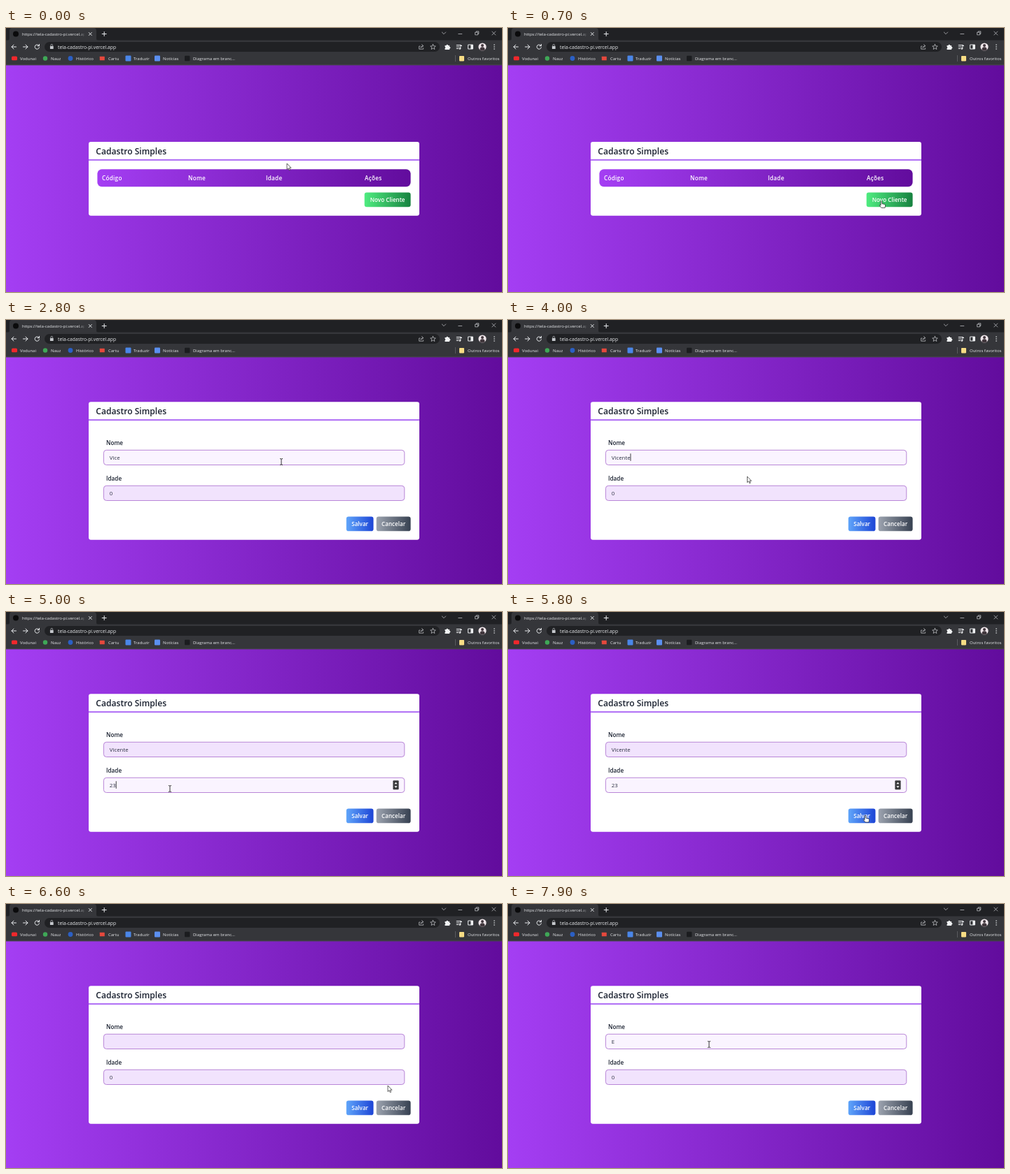
Write an HTML page that moves like this. It is 708 px wide and 378 px high and loops after 8000 ms.

```html
<!DOCTYPE html>
<html lang="pt-BR">
<head>
<meta charset="utf-8">
<title>Cadastro Simples</title>
<style>
html, body { margin: 0; width: 100%; height: 100%; overflow: hidden; background: #35363a; }
svg { display: block; width: 708px; height: 378px; font-family: "Open Sans", "Noto Sans", sans-serif; }
text { white-space: pre; }
.title { font-size: 12.1px; font-weight: 600; fill: #1a2130; }
.label { font-size: 8.2px; font-weight: 600; fill: #1a2130; }
.head { font-size: 8.2px; font-weight: 600; fill: #fff; letter-spacing: .25px; }
.value { font-size: 7.85px; fill: #2b3040; }
.btn { font-size: 8.1px; font-weight: 600; fill: #fff; }
.ui { font-size: 6px; fill: #e8eaed; }
.url { font-size: 6.75px; fill: #e8eaed; }
.line { fill: none; stroke: #e8eaed; stroke-width: 1; stroke-linecap: round; stroke-linejoin: round; }
.thin { stroke: #c3c5c9; stroke-width: .75; }
</style>
</head>
<body>
<svg id="stage" viewBox="0 0 708 378">
  <defs id="defs"></defs>
  <g id="page"></g>
  <g id="empty"></g>
  <g id="filled"></g>
  <g id="form"></g>
  <g id="pointer"></g>
</svg>
<script>
const LOOP = 8000, STEP = 100;
const OPEN = 900, SAVED = 5900, REOPEN = 6600;
const MIDDLE = 215.8;
const $ = id => document.getElementById(id);

const rect = (x, y, w, h, fill, r = 0, more = '') =>
  `<rect x="${x}" y="${y}" width="${w}" height="${h}" rx="${r}" fill="${fill}" ${more}/>`;
const text = (x, y, cls, s, more = '') => `<text x="${x}" y="${y}" class="${cls}" ${more}>${s}</text>`;
const line = (d, cls = '', more = '') => `<path class="line ${cls}" d="${d}" ${more}/>`;
const dot = (x, y, r, fill) => `<circle cx="${x}" cy="${y}" r="${r}" fill="${fill}"/>`;
const grad = (id, a, b) =>
  `<linearGradient id="${id}"><stop stop-color="${a}"/><stop offset="1" stop-color="${b}"/></linearGradient>`;

$('defs').innerHTML =
  grad('purple', '#a43ef3', '#620c9d') +
  grad('green', '#4fec80', '#178240') +
  grad('blue', '#60a5fa', '#1d45d6') +
  grad('gray', '#9ca3af', '#374151') +
  `<linearGradient id="fade"><stop stop-color="#35363a" stop-opacity="0"/><stop offset="1" stop-color="#35363a"/></linearGradient>`;

function browser() {
  const marks = [
    [20, 'Vodunai'], [64, 'Nauz'], [100, 'Histórico'], [146, 'Cartu'],
    [182, 'Traduzir'], [224, 'Notícias'], [267, 'Diagrama em branc...'], [659, 'Outros favoritos']
  ];
  return rect(0, 0, 708, 18, '#202124') +
    `<path d="M2 18q3 0 3-3V4q0-4 4-4H125q4 0 4 4V15q0 3 3 3z" fill="#35363a"/>` +
    rect(0, 17.5, 708, 35.7, '#35363a') +
    dot(14, 8.5, 4, '#0b0b0c') +
    text(23, 10.8, 'ui', 'https://tela-cadastro-pi.vercel.ap') +
    rect(104, 2, 9, 13, 'url(#fade)') + rect(113, 2, 4, 13, '#35363a') +
    line('M118.3 6.5l4 4m0-4l-4 4M137.2 8.5h6m-3-3v6') +
    line('M622.3 6l2.7 2.7l2.7-2.7M645.8 8.5h5M693.8 5l5 5m0-5l-5 5', 'thin') +
    line('M670 6.2h3.6v3.6h-3.6zM671.2 6v-1.2h3.6v3.6h-1', 'thin') +
    // toolbar
    line('M14.5 27h-6.5m3-3l-3 3l3 3') +
    line('M24.5 27h6.5m-3-3l3 3l-3 3') +
    line('M47 25.2a3.2 3.2 0 1 0 .5 2.6M47.5 23.3v2.4h-2.4') +
    rect(55, 20, 564, 14, '#202124', 7) +
    rect(62.9, 26, 4.8, 4, '#c4c7cc', .6) + line('M64 26v-1.4a1.3 1.3 0 0 1 2.6 0v1.4', 'thin') +
    text(74, 29.5, 'url', 'tela-cadastro-pi.vercel.app') +
    line('M591 26h-1.3v4.2h6v-1.4M591.8 28.4q.3-2.8 3.4-2.8M593.6 23.6l2.2 2l-2.2 2', 'thin') +
    line('M609.5 23.3l1.1 2.5l2.7.2l-2.1 1.8l.7 2.7l-2.4-1.5l-2.4 1.5l.7-2.7l-2.1-1.8l2.7-.2z', 'thin') +
    `<path d="M626.5 25h2a1.3 1.3 0 0 1 2.6 0h2v2a1.3 1.3 0 0 1 0 2.6v1.4h-6.6v-2a1.2 1.2 0 0 0 0-2.2z" fill="#f1f3f4"/>` +
    line('M643.2 24.5h6.4M643.2 27h4M643.2 29.5h2.6M648.8 29.5v-4h1.8') + dot(647.9, 29.6, 1.2, '#f1f3f4') +
    line('M660 24h6.4v6h-6.4z') + rect(663.4, 24, 3, 6, '#f1f3f4') +
    dot(680, 27, 5.6, '#efe6ea') + dot(680, 25, 2, '#40363c') +
    `<path d="M676.4 31.2q0-4 3.6-4t3.6 4q-3.6 2.4-7.2 0z" fill="#40363c"/>` +
    [24, 27, 30].map(y => dot(697, y, .8, '#e8eaed')).join('') +
    // bookmarks
    rect(8, 40.5, 8, 5.8, '#f0282c', 1.6) + dot(56, 43.5, 3.2, '#3fa757') + dot(92, 43.5, 3.4, '#2b5fc4') +
    rect(133.8, 40.7, 7, 5.6, '#e5483d', .6) + rect(170.5, 39.6, 8, 8, '#4a86e8', 1) +
    rect(212, 39.6, 8, 8, '#5b8ff0', 1) + rect(255, 39.8, 7.4, 7.4, '#1b1c1f', 1) +
    rect(641, 39, .7, 9, '#6a6c70') + rect(647, 40, 7, 7.4, '#f7dc84', .8) +
    marks.map(([x, s]) => text(x, 45.7, 'ui', s)).join('') +
    rect(0, 52.5, 708, .8, '#4a4b4f');
}

// panels are centred on the page
const panel = (top, h) =>
  rect(118, top, 472, h, '#fff', 3.1) +
  text(128.3, top + 17.8, 'title', 'Cadastro Simples') +
  rect(118, top + 24.9, 472, 2.05, '#b06ff5');

const button = (x, y, w, fill, s) =>
  rect(x, y, w, 20.7, fill, 3.1) + text(x + w / 2, y + 13.3, 'btn', s, 'text-anchor="middle"');

function list(cols, row) {
  const h = row ? 131.6 : 105.7;
  const top = MIDDLE - h / 2, y = top + 39.4;
  const names = ['Código', 'Nome', 'Idade', 'Ações'];
  let out = panel(top, h);
  if (row) {
    out += rect(130.4, y + 8, 447.2, 42.8, '#f2e5fe', 6.2) +
      `<path d="M130.4 ${y + 24.9}v-18.700q0-6.200 6.200-6.200h434.800q6.200 0 6.200 6.200v18.700z" fill="url(#purple)"/>` +
      row.map((s, i) => text(cols[i], y + 41.5, 'value', s)).join('') +
      `<g transform="translate(0 ${y + 32.2})">` +
      line('M516 1.5h-3.8q-1.2 0-1.2 1.2v6.6q0 1.2 1.2 1.2h6.6q1.2 0 1.2-1.2v-3.6M514 7.6l.5-2.3l5-5l1.8 1.8l-5 5z', '', 'style="stroke:#34a862"') +
      line('M536 2.2h9.6M539 2v-1.5h3.6v1.5M537 2.4l.6 8.6h6.4l.6-8.6M539.6 4.5v4.3M542 4.5v4.3', '', 'style="stroke:#d04463"') +
      '</g>';
  } else {
    out += rect(130.4, y, 447.2, 24.9, 'url(#purple)', 6.2);
  }
  return out + names.map((s, i) => text(cols[i], y + 15.5, 'head', s)).join('') +
    button(511.7, top + h - 33.1, 65.9, 'url(#green)', 'Novo Cliente');
}

const field = (id, y, label) =>
  text(143, y - 7.4, 'label', label) +
  rect(139.4, y + .3, 429.4, 21.2, '#f1e3fd', 4, `id="${id}Box" stroke="#b17ad3" stroke-width=".9"`) +
  text(147.8, y + 14, 'value', '', `id="${id}Text"`) +
  rect(0, y + 5.2, .8, 10.6, '#111', 0, `id="${id}Caret"`);

$('page').innerHTML = rect(0, 53, 708, 325, 'url(#purple)') + browser();
$('empty').innerHTML = list([137, 260, 371, 512]);
$('filled').innerHTML = list([137, 339, 417, 516], ['pAtNSPaa7x5E1NBRHJ6B', 'Vicente', '23']);
$('form').innerHTML = panel(117.2, 197.5) + field('name', 186, 'Nome') + field('age', 237, 'Idade') +
  `<g id="spin">${rect(552.4, 241.2, 8.2, 13, '#3a3a3c', 1)}<path d="M554.4 246.3l2.1-2.5l2.1 2.5zM554.4 249.2l2.1 2.5l2.1-2.5z" fill="#fff"/></g>` +
  button(485.8, 281.6, 38.7, 'url(#blue)', 'Salvar') + button(528.7, 281.6, 48.9, 'url(#gray)', 'Cancelar');

const shapes = {
  arrow: '<path d="M0 0v8.6l2-1.8l1.3 3l1.4-.6l-1.3-2.9h2.6z" fill="#fff" stroke="#222" stroke-width=".7"/>',
  beam: '<path d="M-2-4.5q2 0 2 1q0-1 2-1M0-3.5v7M-2 4.5q2 0 2-1q0 1 2 1" fill="none" stroke="#222" stroke-width=".9"/>',
  hand: '<path d="M-.9 5V.6q0-.9.9-.9t.9.9v3l3.6.8q1.2.3 1.1 1.5l-.5 3.6h-5l-3-3.6q.6-1.3 2 .2z" fill="#fff" stroke="#222" stroke-width=".7"/>'
};

// pointer route: time, x, y
const route = [
  [0, 401, 194], [700, 533, 248], [900, 533, 248], [1100, 412, 205], [1300, 393, 203],
  [3900, 393, 203], [4100, 290, 245], [4200, 255, 258], [4300, 234, 253],
  [5100, 234, 253], [5800, 510, 291.5], [5900, 510, 291.5], [6400, 545, 260],
  [6600, 545, 260], [6900, 306, 201], [7200, 287, 201], [LOOP, 287, 201]
];

// edits: time, focused field, its text, start of the caret blink
const edits = [
  [OPEN, '', ''], [1100, 'name', ''], [1900, 'name', 'V'], [2000, 'name', 'Vi'], [2200, 'name', 'Vic'],
  [2300, 'name', 'Vice'], [3000, 'name', 'Vicen'], [3400, 'name', 'Vicent'], [3600, 'name', 'Vicente'],
  [4100, 'age', '0'], [4800, 'age', ''], [4900, 'age', '2'], [5000, 'age', '23'],
  [REOPEN, '', ''], [6900, 'name', '', 7000], [7600, 'name', 'E', 7400]
];

function place(t) {
  const i = Math.max(1, route.findIndex(p => p[0] >= t));
  const [t0, x0, y0] = route[i - 1], [t1, x1, y1] = route[i];
  const k = (t - t0) / (t1 - t0);
  const e = t1 - t0 > 250 ? k * k * (3 - 2 * k) : k;
  return [x0 + (x1 - x0) * e, y0 + (y1 - y0) * e];
}

function fields(t) {
  const state = { name: '', age: '0', focus: '', blink: 0 };
  for (const [at, id, s, from = at] of edits) {
    if (at > t) break;
    if (id) state[id] = s;
    else Object.assign(state, { name: '', age: '0' });
    state.focus = id;
    state.blink = from;
  }
  return state;
}

const show = (id, on) => $(id).setAttribute('visibility', on ? 'visible' : 'hidden');

function draw(t) {
  const view = t < OPEN ? 'empty' : t >= SAVED && t < REOPEN ? 'filled' : 'form';
  for (const id of ['empty', 'filled', 'form']) $(id).style.display = id === view ? '' : 'none';

  const [x, y] = place(t);
  const over = (x0, y0, w, h) => x >= x0 && x <= x0 + w && y >= y0 && y <= y0 + h;
  const overAge = over(139, 237, 430, 21.5);
  let shape = 'arrow';

  if (view === 'form') {
    const s = fields(t);
    for (const id of ['name', 'age']) {
      const label = $(id + 'Text'), on = s.focus === id;
      label.textContent = s[id];
      $(id + 'Box').setAttribute('fill', on ? '#faf4ff' : '#f1e3fd');
      show(id + 'Caret', on && (t - s.blink) % 1000 < 500);
      $(id + 'Caret').setAttribute('x', 147.8 + (s[id] ? label.getComputedTextLength() : 0));
    }
    show('spin', overAge || s.focus === 'age');
    if (over(139, 186, 430, 21.5) || (overAge && t < REOPEN)) shape = 'beam';
    else if (over(486, 281.6, 38.5, 20.7) || over(529, 281.6, 48.5, 20.7)) shape = 'hand';
  } else if (over(512, view === 'empty' ? 235.6 : 248.5, 65.5, 20.7)) {
    shape = 'hand';
  }

  const p = $('pointer');
  p.setAttribute('transform', `translate(${x.toFixed(2)} ${y.toFixed(2)})`);
  p.innerHTML = shapes[shape];
}

function tick() {
  const t = performance.now() % LOOP;
  draw(Math.floor(t / STEP) * STEP);
  requestAnimationFrame(tick);
}
tick();
</script>
</body>
</html>
```
